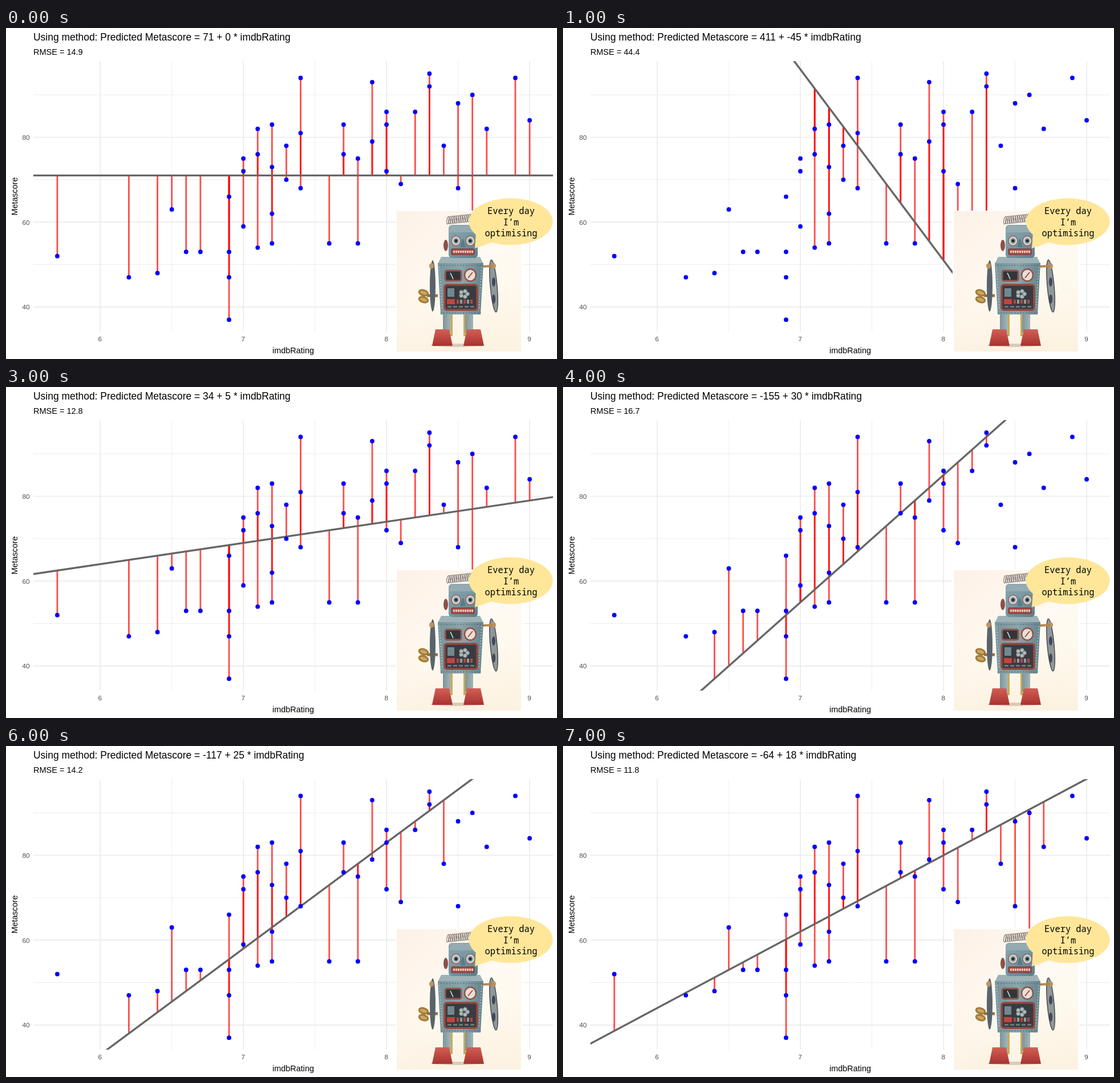
Recreate the animation shown at these times as an HTML page with a canvas. Size 966 by 580 pixels, loop 8000 ms.

```html
<!DOCTYPE html>
<html lang="en">
<head>
<meta charset="utf-8">
<title>Fitting a line</title>
<style>
html, body { margin: 0; width: 100%; height: 100%; overflow: hidden; background: #fff; }
canvas { display: block; }
</style>
</head>
<body>
<canvas id="stage" width="966" height="580"></canvas>
<script>
const ctx = document.getElementById('stage').getContext('2d');
const SANS = '"Liberation Sans", Arial, sans-serif';
const MONO = '"Noto Sans Mono", monospace';
const STEP_MS = 1000;

// Slopes tried in turn; every line passes through the mean of the data.
const slopes = [0, -45, -20, 5, 30, 10, 25, 18];
const mean = { rating: 7.55, score: 71.45 };
const best = { slope: 13.26, variance: 126.5, curve: 0.5435 };
const interceptFor = slope => Math.round(mean.score - slope * mean.rating);
const rmseFor = slope =>
  +Math.sqrt(best.variance + best.curve * (slope - best.slope) ** 2).toFixed(1);

// Scores per rating, from 5.7 upwards in steps of 0.1.
const scores = [
  [52], [], [], [], [], [47], [], [48], [63], [53], [53], [],
  [66, 53, 47, 37], [75, 72, 59], [82, 76, 54], [83, 73, 62, 55], [78, 70],
  [94, 81, 68], [], [55], [83, 76], [75, 55], [93, 79], [86, 83, 72], [69],
  [86], [95, 92], [78], [88, 68], [90, 50], [82], [], [94], [84]
];
const points = scores.flatMap((list, i) => list.map(s => [(57 + i) / 10, s]));

const panel = { left: 48, top: 58, right: 959, bottom: 532 };
const px = rating => 165.2 + (rating - 6) * 250.95;
const py = score => 191.5 + (80 - score) * 7.435;

function paint(fill, stroke, width) {
  if (fill) { ctx.fillStyle = fill; ctx.fill(); }
  if (stroke) { ctx.strokeStyle = stroke; ctx.lineWidth = width; ctx.stroke(); }
}

function line(x1, y1, x2, y2, color, width) {
  ctx.beginPath();
  ctx.moveTo(x1, y1);
  ctx.lineTo(x2, y2);
  paint(null, color, width);
}

function ellipse(x, y, rx, ry, fill, stroke, width = 1, turn = 0) {
  ctx.beginPath();
  ctx.ellipse(x, y, rx, ry, turn, 0, Math.PI * 2);
  paint(fill, stroke, width);
}

function box(x, y, w, h, r, fill, stroke, width = 1) {
  ctx.beginPath();
  ctx.roundRect(x, y, w, h, r);
  paint(fill, stroke, width);
}

// Symmetric block that narrows or widens from top to bottom.
function block(x, top, bottom, topHalf, bottomHalf, fill) {
  ctx.beginPath();
  ctx.moveTo(x - topHalf, top);
  ctx.lineTo(x + topHalf, top);
  ctx.lineTo(x + bottomHalf, bottom);
  ctx.lineTo(x - bottomHalf, bottom);
  paint(fill);
}

function shade(x1, y1, x2, y2, ...colors) {
  const g = ctx.createLinearGradient(x1, y1, x2, y2);
  colors.forEach((c, i) => g.addColorStop(i / (colors.length - 1), c));
  return g;
}

function label(text, x, y, size, { color = '#000', align = 'left', font = SANS } = {}) {
  ctx.font = `${size}px ${font}`;
  ctx.fillStyle = color;
  ctx.textAlign = align;
  ctx.fillText(text, x, y);
}

function drawGrid() {
  const { left, top, right, bottom } = panel;
  const color = '#4d4d4d';
  const weight = major => major ? 1.7 : 0.9;
  for (let s = 40; s <= 90; s += 10) {
    const major = s % 20 === 0;
    line(left, py(s), right, py(s), '#ebebeb', weight(major));
    if (major) label(s, 41.5, py(s) + 4.5, 11.8, { color, align: 'right' });
  }
  for (let r = 6; r <= 9; r += 0.5) {
    const major = r % 1 === 0;
    line(px(r), top, px(r), bottom, '#ebebeb', weight(major));
    if (major) label(r, px(r) - 0.4, 549, 11.8, { color, align: 'center' });
  }
}

function drawFit(slope) {
  const intercept = interceptFor(slope);
  const predict = r => intercept + slope * r;
  label(`Using method: Predicted Metascore = ${intercept} + ${slope} * imdbRating`, 48, 22, 17.44);
  label(`RMSE = ${rmseFor(slope)}`, 48, 47, 14.5);

  for (const [r, s] of points) {
    const p = predict(r);
    if (p >= 37 && p <= 95) line(px(r), py(s), px(r), py(p), 'rgba(255,0,0,.7)', 2.8);
  }
  ctx.save();
  ctx.beginPath();
  ctx.rect(panel.left, panel.top, panel.right - panel.left, panel.bottom - panel.top);
  ctx.clip();
  line(px(5.4), py(predict(5.4)), px(9.3), py(predict(9.3)), '#666', 3.4);
  ctx.restore();
  for (const [r, s] of points) ellipse(px(r), py(s), 3.9, 3.9, '#00f');
}

function drawAxisTitles() {
  label('imdbRating', 503.5, 569.5, 14.4, { align: 'center' });
  ctx.save();
  ctx.translate(20, 295);
  ctx.rotate(-Math.PI / 2);
  label('Metascore', 0, 0, 14.4, { align: 'center' });
  ctx.restore();
}

function drawBackdrop() {
  box(683, 320, 222, 249, 0, '#fff');
  box(685, 321, 218, 246, 0, shade(685, 321, 903, 567, '#fdf1e7', '#fffaf2', '#fef8ea'));
  box(685, 440, 218, 127, 0, shade(0, 440, 0, 567, 'rgba(250,238,214,0)', 'rgba(249,235,214,.5)'));
  ellipse(790, 556, 46, 3, 'rgba(120,85,65,.25)');
}

function drawLimbs() {
  // wind-up key
  for (const y of [464, 476]) ellipse(732, y, 8, 4.5, '#c9a562', '#a27a38', 3, 0.3);
  line(738, 469, 757, 469, '#94713a', 5);
  // arms
  ellipse(748, 452, 5, 45, '#59636b');
  ellipse(855, 452, 6, 46, '#8f9799', '#4a4e56', 1.5, -0.09);
  for (const y of [445, 475]) ellipse(855, y, 3, 8, '#42485a');
  for (const x of [746, 855]) ellipse(x, 417, 4, 5, '#bd935f');
  line(834, 418, 854, 417, '#b5874e', 4);
  // legs and feet
  for (const x of [773, 812]) {
    const side = Math.sign(x - mean.rating - 785);
    line(x - side * 8, 500, x - side * 8, 540, '#c9ab55', 4);
    block(x, 499, 534, 7, 7, shade(x - 7, 0, x + 7, 0, '#7d959b', '#a3b5b6'));
    block(x + side * 8, 528, 557, 12, 18, shade(0, 528, 0, 557, '#d25f55', '#a93230'));
  }
}

function drawHead() {
  for (let i = 0; i < 13; i++) ellipse(775 + i * 3.3, 337 - i * 0.35, 2, 7, null, '#5a5450', 1, 0.15);
  ellipse(771, 381, 4, 10, '#8d5148');
  box(776, 345, 51, 58, 6, shade(776, 345, 827, 403, '#8ba6af', '#7797a3', '#5d7c8a'));
  block(801, 346, 358, 20, 25, '#94abb2');
  for (const x of [789, 814]) {
    ellipse(x, 373, 8, 8.5, '#d5d5cc', '#96605a', 1.5);
    ellipse(x, 373, 4.5, 4.8, '#6f929f');
    ellipse(x, 373, 2.5, 2.5, '#20272d');
  }
  block(801, 370, 384, 1, 5, '#4f7f8d');
  box(781, 387, 40, 10, 2, '#ad4943', '#7d4440', 1.5);
  for (let x = 784; x < 818; x += 4) box(x, 390, 3, 4, 0, '#e0cabf');
}

function drawBody() {
  block(797, 401, 413, 34, 40, '#9db2b6');
  block(797, 412, 502, 40, 35, shade(757, 0, 837, 0, '#78949d', '#8ba6ac', '#67838e'));
  for (let i = 0; i < 15; i++) {
    const edge = 37 - i / 3;
    for (const x of [797 - edge, 797 + edge]) ellipse(x, 420 + i * 5, 0.9, 0.9, '#c1cfcd');
    for (const y of [416, 499]) ellipse(763 + i * 4.9, y, 0.9, 0.9, '#566c75');
  }
  // gauges
  box(770, 425, 28, 18, 3, '#30363b', '#93594d', 3);
  line(784, 440, 779, 429, '#e9e8dd', 1.5);
  ellipse(814, 433, 10, 10.5, '#e3e1d7', '#935349', 2.5);
  line(810, 438, 818, 428, '#b93633', 1.8);
  // control panel
  box(769, 450, 57, 44, 4, '#393b40', '#95483d', 3.5);
  box(774, 456, 12, 15, 1, '#718890');
  box(773, 475, 14, 9, 1, '#c2443d');
  for (let i = 0; i < 5; i++) {
    const angle = i * Math.PI * 0.4;
    ellipse(803 + 6 * Math.cos(angle), 466 + 5 * Math.sin(angle), 3.5, 3.5, '#aebbb9', '#69777a');
    box(790 + i * 6, 476, 4, 7, 0, i % 2 ? '#8c9e9e' : '#b1483f');
    box(774 + i * 10, 487, 7, 3, 0, '#687b7e');
  }
}

function drawBubble() {
  const fill = '#ffe699';
  ellipse(885, 339.3, 73.5, 41, fill);
  ctx.beginPath();
  ctx.moveTo(824, 358);
  ctx.lineTo(822, 386);
  ctx.lineTo(854, 375);
  paint(fill);
  ['Every day', 'I’m', 'optimising'].forEach((text, i) =>
    label(text, 885.5, 326 + i * 19.6, 15.35, { align: 'center', font: MONO }));
}

function draw(slope) {
  box(0, 0, 966, 580, 0, '#fff');
  drawGrid();
  drawFit(slope);
  drawAxisTitles();
  drawBackdrop();
  drawLimbs();
  drawBody();
  drawHead();
  drawBubble();
}

let start, shown;
function tick(now) {
  start ??= now;
  const index = Math.floor((now - start) / STEP_MS) % slopes.length;
  if (index !== shown) draw(slopes[shown = index]);
  requestAnimationFrame(tick);
}
requestAnimationFrame(tick);
</script>
</body>
</html>
```
